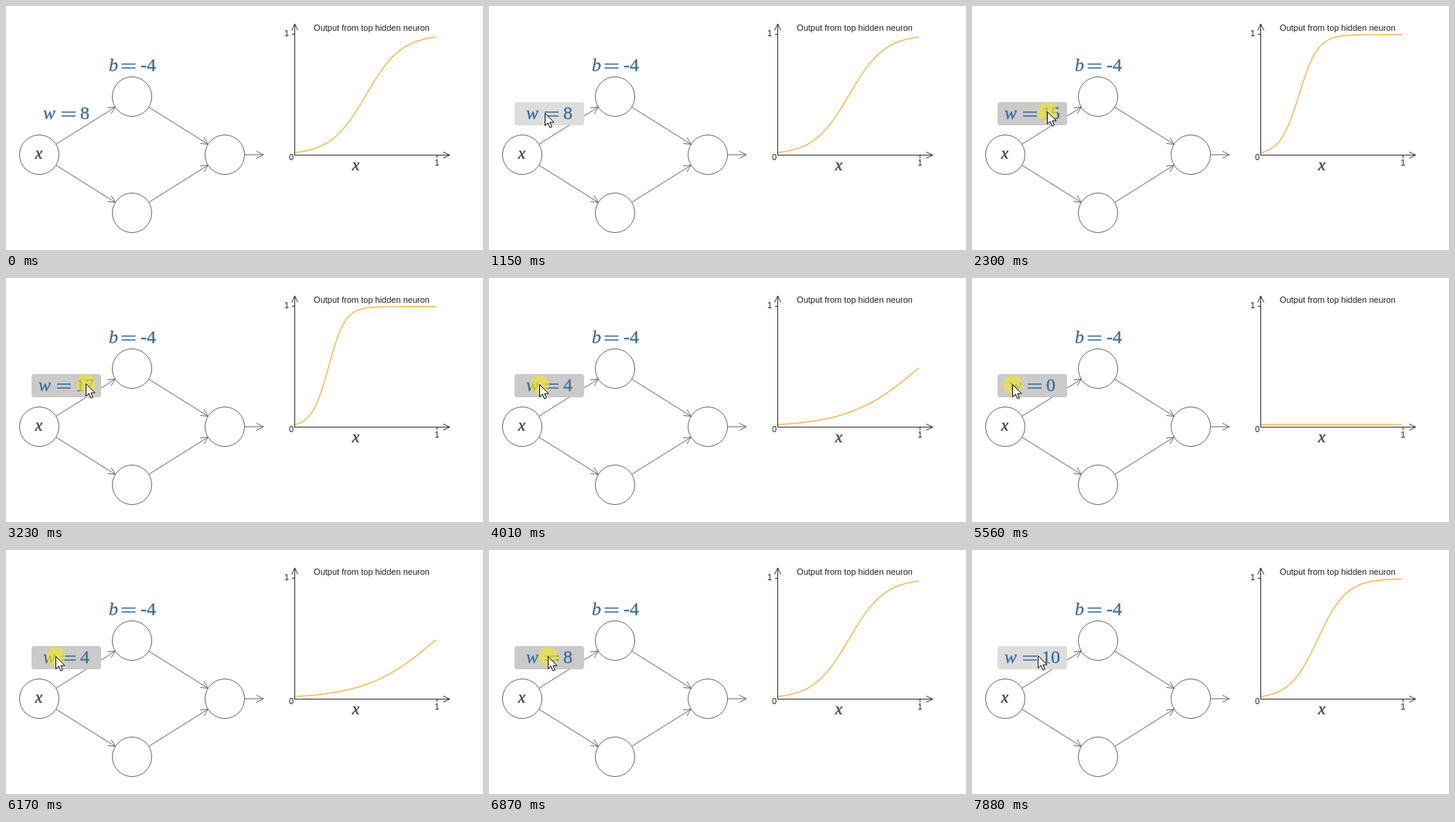
An HTML page for the animation above (8000 ms loop, 617x315 px).

```html
<!DOCTYPE html>
<html lang="en">
<head>
<meta charset="utf-8">
<title>Hidden neuron output</title>
<style>
  html, body { margin: 0; width: 100%; height: 100%; overflow: hidden; background: #fff; }
  svg { display: block; width: 617px; height: 315px; }
  .net, .axis { fill: none; stroke: #6a6a6a; stroke-width: 1; }
  .axis { stroke: #333; }
  .label { font: 11px "Liberation Sans", Arial, sans-serif; fill: #222; text-anchor: middle; }
  .math { font: 24px "Liberation Serif", "Times New Roman", serif; fill: #3a6c9a; stroke: #3a6c9a; stroke-width: .3; }
  .math path { stroke-width: 1.3; }
  .var { font-style: italic; }
  .x { font: italic 21px "Liberation Serif", "Times New Roman", serif; fill: #444; stroke: #444; stroke-width: .4; text-anchor: middle; }
  #curve { fill: none; stroke: #fbb040; stroke-width: 1.3; }
</style>
</head>
<body>
<svg viewBox="0 0 617 315">
  <g class="net">
    <circle cx="43" cy="192" r="25.5"/>
    <circle cx="163" cy="117" r="25.5"/>
    <circle cx="163" cy="267" r="25.5"/>
    <circle cx="283" cy="192" r="25.5"/>
    <path id="links"/>
  </g>
  <g class="axis">
    <path d="M373.5 192.5V23M369.5 31.5L373.5 23L377.5 31.5M370 36.5H373.5"/>
    <path d="M373 192.5H574M565.5 188.5L574 192.5L565.5 196.5M557.5 192.5V196"/>
  </g>
  <g class="label">
    <text x="473" y="32">Output from top hidden neuron</text>
    <text x="363" y="39">1</text>
    <text x="369" y="198.5">0</text>
    <text x="557.5" y="206">1</text>
  </g>
  <text class="x" x="42.5" y="196.5">x</text>
  <text class="x" x="452.5" y="212">x</text>
  <path id="curve"/>
  <rect id="box" x="33" y="124" width="90" height="30" rx="3.5"/>
  <g class="math" transform="translate(133 84)">
    <text class="var">b</text>
    <path d="M16.5 -9h18M16.5 -4h18"/>
    <text x="41">-4</text>
  </g>
  <g class="math" id="weight">
    <text class="var">w</text>
    <path d="M24 -9h18M24 -4h18"/>
    <text x="48" id="value"></text>
  </g>
  <g id="cursor">
    <circle id="press" cx=".5" cy=".5" r="12.3" fill="#f0e430" opacity=".68"/>
    <path d="M.5 .5V16.5L4.2 13L6.8 19L9.4 18L6.8 12.2H12Z" fill="#fff" stroke="#111"/>
  </g>
</svg>
<script>
const LOOP = 8000, TICK = 77.2, LEAD = 18, BIAS = -4;
const PRESS = 20, DRAG = 21, RELEASE = 102;
const $ = id => document.getElementById(id);

// Moves: start tick, end tick, then where to: a point, or a weight
const approach = [[1, 5, 149, 190], [7, 15, 72, 138], [15, 18, 76, 136]];
const drag = [
  [21, 32, 16.7], [32, 37, 19.7], [40, 51, 5], [51, 63, -5], [65, 72, 0],
  [72, 75, 1.4], [76, 84, 6.7], [86, 89, 8], [93, 99, 10.9]
];

function follow(from, moves, n) {
  return moves.reduce((pos, [start, end, ...to]) => {
    const u = Math.min(1, Math.max(0, (n - start) / (end - start)));
    return pos.map((p, i) => p + (to[i] - p) * u);
  }, from);
}

function arrow(x1, y1, x2, y2) {
  const d = Math.hypot(x2 - x1, y2 - y1), c = (x2 - x1) / d, s = (y2 - y1) / d;
  const wing = k => `${x2 - 9 * c - k * s} ${y2 - 9 * s + k * c}`;
  return `M${x1} ${y1}L${x2} ${y2}M${wing(4.5)}L${x2} ${y2}L${wing(-4.5)}`;
}

function link(x1, y1, x2, y2) {
  const k = 25.5 / Math.hypot(x2 - x1, y2 - y1);
  const dx = (x2 - x1) * k, dy = (y2 - y1) * k;
  return arrow(x1 + dx, y1 + dy, x2 - dx, y2 - dy);
}

function sigmoid(w) {
  const points = Array.from({ length: 100 }, (_, i) => {
    const x = i / 100, y = 1 / (1 + Math.exp(-(w * x + BIAS)));
    return `${(374 + 184 * x).toFixed(2)} ${(192 - 155 * y).toFixed(2)}`;
  });
  return 'M' + points.join('L');
}

$('links').setAttribute('d',
  link(43, 192, 163, 117) + link(43, 192, 163, 267) +
  link(163, 117, 283, 192) + link(163, 267, 283, 192) +
  arrow(308.5, 192, 333, 192));

function draw(n) {
  const [pull] = follow([8], drag, n);
  const [x, y] = n < DRAG ? follow([347, 282], approach, n) : [52 + 3 * pull, 137.3 - pull / 10];
  const held = n >= PRESS && n < RELEASE;
  const over = n > 0 && x >= 33 && x <= 123 && y >= 124 && y <= 154;
  const w = Math.floor(pull + 1e-6);
  const width = 12 * String(Math.abs(w)).length + (w < 0 ? 8 : 0);

  $('value').textContent = w;
  $('weight').setAttribute('transform', `translate(${54 - width / 2} 146)`);
  $('curve').setAttribute('d', sigmoid(w));
  $('box').setAttribute('fill', held ? '#cacaca' : over ? '#dddddd' : 'none');
  $('press').style.display = held ? '' : 'none';
  $('cursor').style.display = n > 0 ? '' : 'none';
  $('cursor').setAttribute('transform', `translate(${Math.round(x)} ${Math.round(y)})`);
}

let last = -1;
function frame() {
  const n = Math.floor((performance.now() % LOOP + LEAD) / TICK);
  if (n !== last) draw(last = n);
  requestAnimationFrame(frame);
}
frame();
</script>
</body>
</html>
```
